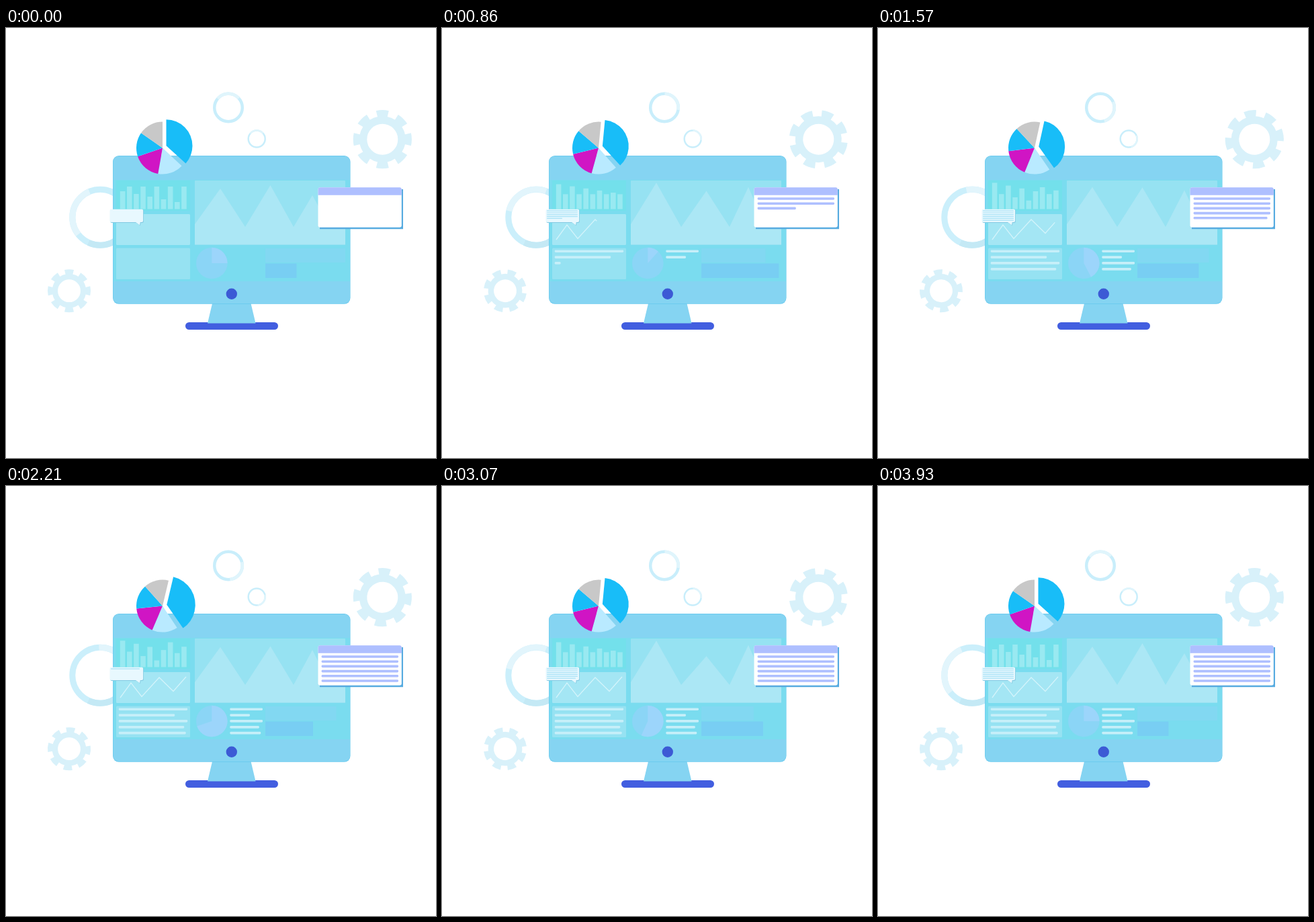
An HTML page with a canvas that plays this animation: 640 by 640 pixels, repeating every 4000 ms.

```html
<!DOCTYPE html>
<html lang="en">
<head>
<meta charset="utf-8">
<title>Dashboard</title>
<style>
html, body { margin: 0; width: 100%; height: 100%; overflow: hidden; background: #fff; }
canvas { display: block; width: 640px; height: 640px; }
</style>
</head>
<body>
<canvas id="stage" width="640" height="640"></canvas>
<script>
const ctx = document.getElementById('stage').getContext('2d');
const LOOP = 4000, FPS = 14, LAST = 55, RAD = Math.PI / 180;

// The pose for the current step, set once per draw.
let step, phase, swing, half;

const clamp = x => Math.max(0, Math.min(1, x));
const smooth = x => (x = clamp(x), x * x * (3 - 2 * x));
const mix = (a, b, x) => a + (b - a) * x;

// Runs start -> middle -> end and back; sway makes the return differ.
function cycle(start, middle, end, sway = 0) {
  const base = half < 0.5 ? mix(start, middle, half * 2) : mix(middle, end, half * 2 - 1);
  return base + sway * Math.sin(phase);
}

function box(x, y, w, h, fill, radius = 0) {
  ctx.fillStyle = fill;
  ctx.beginPath();
  ctx.roundRect(x, y, w, h, radius);
  ctx.fill();
}

function poly(points, fill) {
  ctx.fillStyle = fill;
  ctx.beginPath();
  points.forEach(([x, y]) => ctx.lineTo(x, y));
  ctx.closePath();
  ctx.fill();
}

function slice(x, y, r, from, to, fill) {
  ctx.fillStyle = fill;
  ctx.beginPath();
  if (to - from < 360) ctx.moveTo(x, y);
  ctx.arc(x, y, r, from * RAD, to * RAD);
  ctx.fill();
}

function arc(x, y, r, width, from, to, stroke) {
  ctx.strokeStyle = stroke;
  ctx.lineWidth = width;
  ctx.beginPath();
  ctx.arc(x, y, r, from * RAD, to * RAD);
  ctx.stroke();
}

function gear(x, y, scale) {
  const color = '#d8f1fa';
  ctx.save();
  ctx.translate(x, y);
  ctx.scale(scale, scale);
  ctx.rotate(phase / 4);
  arc(0, 0, 28.7, 11.4, 0, 360, color);
  for (let i = 0; i < 8; i++) {
    ctx.fillStyle = color;
    ctx.beginPath();
    ctx.moveTo(-7.2, -33);
    ctx.arc(0, 0, 43.6, -102.6 * RAD, -77.4 * RAD);
    ctx.lineTo(7.2, -33);
    ctx.fill();
    ctx.rotate(Math.PI / 4);
  }
  ctx.restore();
}

// Rows typed one after another; each starts when the previous one ends.
function typedRows(x, y, pitch, height, widths, progress, fill) {
  widths.forEach((w, i) => {
    const shown = w * smooth(progress - i);
    if (shown > 0.3) box(x, y + i * pitch, shown, height, fill, Math.min(height, shown) / 2.5);
  });
}

function rings() {
  const turn = 128 * swing;
  arc(140.3, 281.7, 41.5, 9, 0, 360, '#cbeffb');
  arc(140.3, 281.7, 41.5, 9, 142 + turn, 247 + 0.85 * turn, '#e2f5fc');
  arc(140.3, 281.7, 41.5, 9, 50, 115, '#c4e9f5');
  for (const [x, y, r, w] of [[331, 118.5, 20.8, 4.5], [373.2, 165, 12.5, 2.5]]) {
    arc(x, y, r, w, 0, 360, '#c9eefb');
    arc(x, y, r, w, turn - 140, turn - 42, '#e0f5fc');
  }
}

function monitor() {
  box(267, 438, 138, 11, '#425ee0', 5.5);
  poly([[307, 410], [364.5, 410], [371.5, 439.5], [300, 439.5]], '#85d4f2');
  box(159, 190, 353.5, 220.8, '#66c9ee', 9);
  box(159.6, 190.7, 352.5, 219.4, '#85d4f2', 8.5);
  box(160, 226, 352, 151, '#7adcef');
  box(164, 227, 110, 45, '#73e0eb');
  slice(335.8, 395.8, 8.2, 0, 360, '#3c5ad5');
}

function barChart() {
  for (let i = 0; i < 10; i++) {
    const k = i >> 1;
    const top = i % 2
      ? cycle(236, 249, 229 + (17 + 8 * k) % 41)
      : cycle(243 + 4 * k, 231 + 3 * k, 230 + 5 * k);
    box(169.8 + i * 10.15, top, 7.6, 269.5 - top, '#99e9f1');
  }
}

const TREND = [[170, 315], [186, 293], [202, 313.5], [228, 285], [249, 305.5], [268, 284]];

function lineChart() {
  box(164, 277, 110, 46, '#a4e6f4', 1.5);
  const shown = 150 * Math.sin(clamp(step / 27.5) * Math.PI / 2);
  if (!shown) return;
  ctx.strokeStyle = '#d3f4fb';
  ctx.lineWidth = 1.3;
  ctx.setLineDash([shown, 300]);
  ctx.beginPath();
  TREND.forEach(([x, y]) => ctx.lineTo(x, y));
  ctx.stroke();
  ctx.setLineDash([]);
}

function mountains() {
  box(281, 227, 224, 95.5, '#96e2f2', 1);
  poly([
    [281, 322.5], [281, 292],
    [319, cycle(239, 229, 242)], [356, 296],
    [393.5, cycle(234, 250, 234, -5.5)], [428, 296],
    [456, cycle(249, 235, 246)], [482, 296],
    [505, 262], [505, 322.5]
  ], '#abe7f5');
}

function lowerPanels() {
  const line = '#c6eff9';
  box(164, 327.5, 110, 46.5, '#96e2f2', 1.5);
  typedRows(167.7, 330.4, 8.85, 3.7, [102.5, 83.5, 102.5, 97.5, 100], step / 5.5, line);
  typedRows(333.3, 330.4, 8.85, 3.7, [48.7, 29.7, 48.7, 43.5, 46], (step - 2) / 5, line);

  slice(306.3, 350, 23.3, 0, 360, '#8bd5f6');
  slice(306.3, 350, 23.3, -90, cycle(0, 38, 160, -83), '#9cd5fb');

  box(386, 328, cycle(119, 82, 114, 9), 21, '#82d8f2');
  box(386, 350.5, cycle(46.5, 112, 66, 12), 21.5, '#78cef3');
}

// A soft pulse from 0 to 1 and back around a step.
const pulse = (centre, reach) => smooth(1 - Math.abs(step - centre) / reach);

function pie() {
  const turn = 13.6 * swing;
  const edges = [43, 100, 161, 215, 270];
  ['#b9eaff', '#d015c4', '#18bdf8', '#c8c8c8'].forEach((fill, i) =>
    slice(233, 178.6, 39, edges[i] + turn, edges[i + 1] + turn, fill));
  const radius = 39 + 3.5 * pulse(30, 7) + 1.8 * pulse(49, 6);
  slice(238.5 + 0.8 * swing, 175.3 + 1.4 * swing, radius, turn - 90, turn + 42, '#18bdf8');
}

function bubble() {
  const tail = [[193, 289], [200, 288], [199, 293.3]];
  const shadow = '#83c9e2', face = '#e8f8fe';
  box(155.3, 270.6, 49.6, 19.4, shadow, 2);
  poly(tail.map(([x, y]) => [x + 0.8, y + 0.8]), shadow);
  box(154.5, 269.8, 49.6, 19.2, face, 2);
  poly(tail, face);
  const typing = step < 28 ? step : step - 27.5;
  typedRows(156, 271.6, 2.8, 1.2, Array(6).fill(46), (typing - 0.3) / 2.6, '#a8e2f6');
}

function card() {
  const accent = '#aebfff';
  box(467, 240, 124, 59.2, '#57abe0');
  box(464.5, 237.3, 124.3, 59.5, '#fff', 3);
  box(464.5, 237.3, 124.3, 11.5, accent, [3, 3, 0, 0]);
  typedRows(469.6, 252.2, 7.2, 3.6, Array(6).fill(114.4), (step - 1.5) / 4.2, accent);
}

function draw() {
  phase = 2 * Math.PI * step / LAST;
  swing = (1 - Math.cos(phase)) / 2;
  half = 1 - Math.abs(1 - 2 * step / LAST);
  ctx.fillStyle = '#fff';
  ctx.fillRect(0, 0, 640, 640);
  gear(560.3, 165.7, 1);
  gear(94, 391.2, 0.735);
  rings();
  monitor();
  barChart();
  lineChart();
  mountains();
  lowerPanels();
  pie();
  bubble();
  card();
}

function tick() {
  const time = performance.now() % LOOP;
  step = Math.min(LAST, Math.floor((time + 3) * FPS / 1000));
  draw();
  requestAnimationFrame(tick);
}
tick();
</script>
</body>
</html>
```
